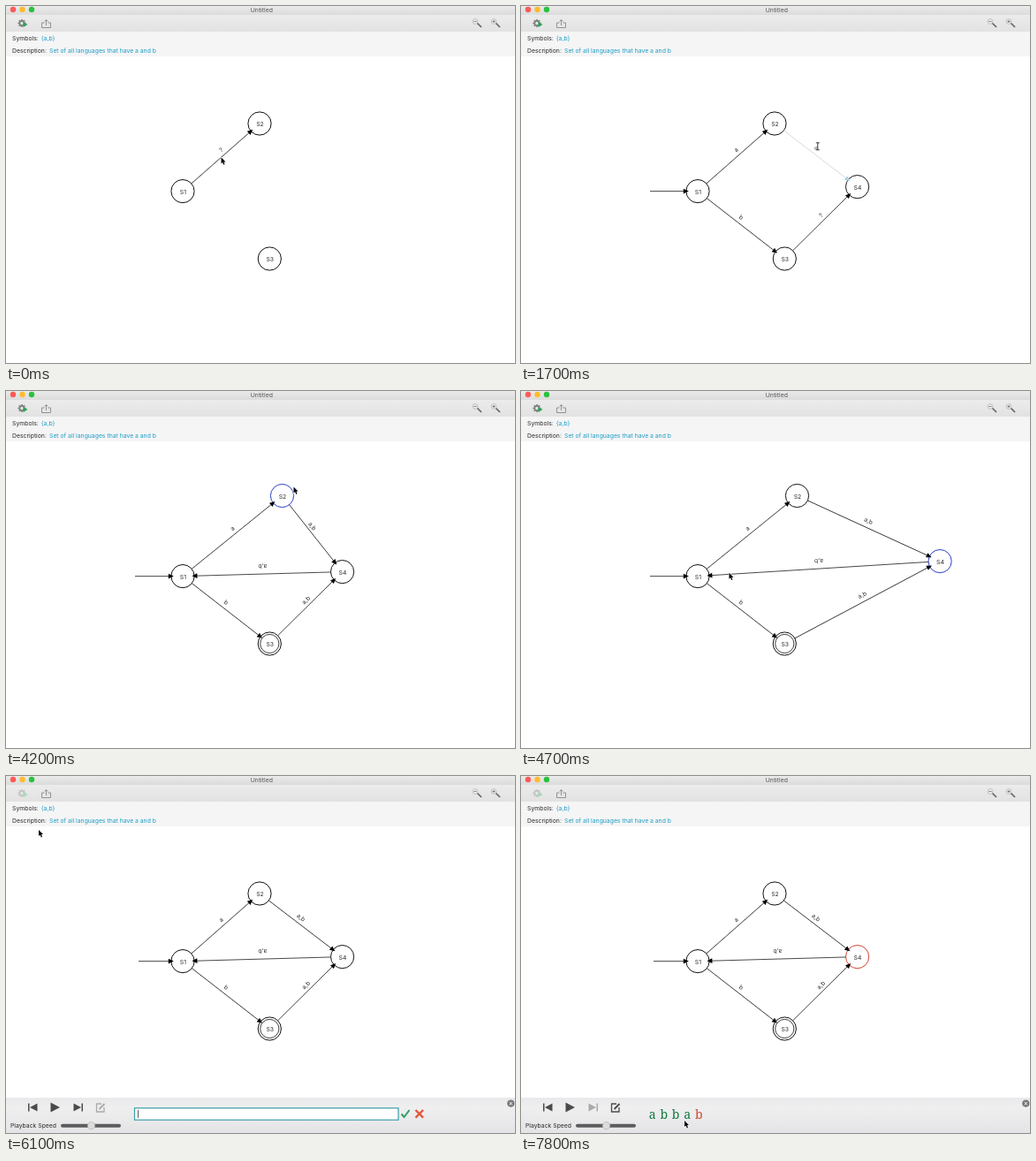
These frames come from a looping animation (576x404 px, 8000 ms). An HTML page with a canvas:

```html
<!DOCTYPE html>
<html lang="en">
<head>
<meta charset="utf-8">
<title>State machine editor</title>
<style>
  html, body { margin: 0; width: 100%; height: 100%; overflow: hidden; background: #fff; }
  canvas { display: block; width: 576px; height: 404px; }
</style>
</head>
<body>
<canvas id="stage" width="576" height="404"></canvas>
<script>
const ctx = document.getElementById('stage').getContext('2d');
const LOOP = 8000, STEP = 100;
const UNDO = 5200, ACCEPT = 3800, PANEL = 6100, CONFIRM = 6800;
const INK = '#111', BLUE = '#2a3fc4', RED = '#cf3f30', TEAL = '#1c9dc4';
const WORD = 'abbab';

const HOME = {
  S1: { x: 200, y: 209.6 }, S2: { x: 287, y: 133 },
  S3: { x: 298.3, y: 286 }, S4: { x: 380.6, y: 204.6 }
};

// Labels are typed one character per step, starting at `edit`.
const EDGES = [
  { from: 'S1', to: 'S2', born: 0, edit: 100, label: 'a' },
  { from: 'S1', to: 'S3', born: 400, edit: 800, label: 'b' },
  { from: 'S2', to: 'S4', born: 1400, edit: 1700, label: 'a,b' },
  { from: 'S3', to: 'S4', born: 1600, edit: 2000, label: 'a,b' },
  { from: 'S4', to: 'S1', born: 2600, edit: 3200, label: 'a,b' }
];

const DRAGS = {
  S2: { end: 4200, dx: 25.5, dy: -14.5 },
  S4: { end: 4500, dx: 93.5, dy: -12 },
  S1: { end: 5000, dx: 12, dy: -20 }
};

const SPOTS = {
  gear: { x: 18, y: 20 }, caption: { x: 37, y: 61 },
  check: { x: 451, y: 382 }, word: { x: 185, y: 390 }
};

// The pointer's itinerary as "arrival place"; a repeated place is a pause.
const ROUTE = `0 S1-S2, 300 S1-S2, 400 S3, 600 S3, 800 S1-S3, 900 S1-S3, 1100 S4, 1400 S4,
  1500 S3, 1600 S4, 1700 S2-S4, 1900 S2-S4, 2000 S3-S4, 2300 S3-S4, 2600 S1, 2900 S4-S1,
  3500 S4-S1, 3700 S3, 3800 S3, 4000 S2, 4200 S2+, 4300 S2+, 4500 S4+, 4800 S1, 5000 S1+,
  5200 S1+, 5900 gear, 6000 gear, 6100 caption, 6700 check, 7800 word, 8000 word`
  .split(',').map(stop => stop.trim().split(' '))
  .map(([time, place]) => ({ time: +time, place }));

const clamp = v => Math.min(1, Math.max(0, v));
const mix = (a, b, u) => ({ x: a.x + (b.x - a.x) * u, y: a.y + (b.y - a.y) * u });
const isEditing = (e, t) => t >= e.edit && t < e.edit + e.label.length * STEP;

function locate(place) {
  if (SPOTS[place]) return SPOTS[place];
  const [a, b] = place.split('-');
  if (b) return mix(HOME[a], HOME[b], 0.5);
  const name = a.slice(0, 2), { x, y } = HOME[name];
  if (!a.endsWith('+')) return { x: x + 4, y: y - 1 };
  return { x: x + DRAGS[name].dx + 13, y: y + DRAGS[name].dy - 10 };
}

function pointerAt(t) {
  const i = Math.max(1, ROUTE.findIndex(stop => stop.time >= t));
  const a = ROUTE[i - 1], b = ROUTE[i];
  const u = (t - a.time) / (b.time - a.time);
  return mix(locate(a.place), locate(b.place), 1 - (1 - u) ** 2);
}

function nodeAt(name, t) {
  const { x, y } = HOME[name], drag = DRAGS[name];
  if (!drag || t >= UNDO) return { x, y };
  const u = clamp((t - drag.end + 200) / 200);
  return { x: x + drag.dx * u, y: y + drag.dy * u };
}

function ringColor(name, t) {
  const drag = DRAGS[name];
  if (drag && t > drag.end - 200 && t <= drag.end + 200) return BLUE;
  return name === 'S4' && t >= CONFIRM ? RED : INK;
}

function text(str, x, y, color = '#2a2a2a', align = 'left', font = '6.83px Inter, sans-serif') {
  ctx.font = font;
  ctx.fillStyle = color;
  ctx.textAlign = align;
  ctx.fillText(str, x, y);
}

function trace(points) {
  ctx.beginPath();
  points.forEach(([x, y]) => ctx.lineTo(x, y));
}

function poly(points, fill) {
  trace(points);
  ctx.fillStyle = fill;
  ctx.fill();
}

function stroke(points, color, width = 1) {
  trace(points);
  ctx.strokeStyle = color;
  ctx.lineWidth = width;
  ctx.stroke();
}

function rect(x, y, w, h, fill) {
  ctx.fillStyle = fill;
  ctx.fillRect(x, y, w, h);
}

function circle(x, y, r, fill, line, width = 1) {
  ctx.beginPath();
  ctx.arc(x, y, r, 0, Math.PI * 2);
  if (fill) { ctx.fillStyle = fill; ctx.fill(); }
  if (line) { ctx.strokeStyle = line; ctx.lineWidth = width; ctx.stroke(); }
}

// Isosceles triangle with its base at x and its tip at x + w.
const triangle = (x, y, w, half, color) => poly([[x, y - half], [x + w, y], [x, y + half]], color);

function cross(x, y, r, color, width) {
  stroke([[x - r, y - r], [x + r, y + r]], color, width);
  stroke([[x - r, y + r], [x + r, y - r]], color, width);
}

function band(y, h, top, bottom) {
  const g = ctx.createLinearGradient(0, y, 0, y + h);
  g.addColorStop(0, top);
  g.addColorStop(1, bottom);
  rect(0, y, 576, h, g);
}

function at(x, y, angle, paint) {
  ctx.save();
  ctx.translate(x, y);
  ctx.rotate(angle);
  paint();
  ctx.restore();
}

function arrow(a, angle, length, color = INK, headColor = '#000') {
  at(a.x, a.y, angle, () => {
    stroke([[0, 0], [length - 3, 0]], color, 0.75);
    triangle(length - 6, 0, 6, 2.8, headColor);
  });
}

function drawEdge(e, t) {
  if (t < e.born) return;
  const a = nodeAt(e.from, t), b = nodeAt(e.to, t), mid = mix(a, b, 0.5);
  const dx = b.x - a.x, dy = b.y - a.y;
  const length = Math.hypot(dx, dy), angle = Math.atan2(dy, dx);
  const editing = isEditing(e, t);
  arrow(mix(a, b, 13 / length), angle, length - 23.4,
    editing ? '#d2d2d2' : INK, editing ? '#a9d3e2' : '#000');
  const label = t < e.edit ? '?' : e.label.slice(0, 1 + (t - e.edit) / STEP);
  at(mid.x, mid.y - 8.5, angle, () => text(label, 0, 2.3, editing ? '#777' : '#333', 'center'));
}

function drawMachine(t) {
  for (const name of Object.keys(HOME)) {
    if (name === 'S4' && t < 1100) continue;
    const { x, y } = nodeAt(name, t), color = ringColor(name, t);
    circle(x, y, 13.1, '#fff', color);
    if (name === 'S3' && t >= ACCEPT) circle(x, y, 10.6, null, color, 0.8);
    text(name, x + 0.4, y + 3.1, '#2a2a2a', 'center');
  }
  EDGES.forEach(e => drawEdge(e, t));
  if (t >= 1200) {
    const { x, y } = nodeAt('S1', t), reach = t < 4800 ? 54 : 50;
    arrow({ x: x - reach, y }, 0, reach - 10.2);
  }
}

function gear(x, y, color) {
  for (let i = 0; i < 8; i++) {
    at(x, y, i * Math.PI / 4, () => stroke([[2.5, 0], [4.6, 0]], color, 1.6));
  }
  circle(x, y, 2.6, null, color, 1.7);
}

function magnifier(x, plus) {
  stroke([[x + 1, 19], [x + 6, 24]], '#666', 1.7);
  circle(x - 1, 17.5, 2.9, '#ededed', '#b4b4b4', 0.8);
  stroke([[x - 2.5, 17.5], [x + 0.5, 17.5]], '#666', 0.8);
  if (plus) stroke([[x - 1, 16], [x - 1, 19]], '#666', 0.8);
}

function shareIcon(x, y) {
  const color = '#8a8a8a';
  stroke([[x - 2, y - 1], [x - 5, y - 1], [x - 5, y + 4.5], [x + 5, y + 4.5], [x + 5, y - 1], [x + 2, y - 1]], color, 0.9);
  stroke([[x, y + 2], [x, y - 4]], color, 0.9);
  stroke([[x - 2, y - 2.5], [x, y - 4.5], [x + 2, y - 2.5]], color, 0.9);
}

function drawChrome(t) {
  band(0, 10, '#eaeaea', '#dbdbdb');
  band(10, 19, '#ececec', '#e2e2e2');
  rect(0, 29, 576, 28, '#f5f5f6');
  ['#fc5b57', '#fdbc2e', '#28c23f'].forEach((c, i) => circle(8 + i * 10.5, 4, 3.2, c));
  text('Untitled', 289.3, 6.6, '#555', 'center');

  const running = t >= PANEL;
  gear(18, 19.5, running ? '#c3c6c8' : '#808080');
  triangle(19.5, 21, 5, 3, running ? '#a5d9b8' : '#2aa557');
  shareIcon(45.5, 20);
  magnifier(532, false);
  magnifier(553, true);

  text('Symbols:', 7, 38.7);
  text('{a,b}', 39.7, 38.7, TEAL);
  text('Description:', 7, 52.8);
  text('Set of all languages that have a and b', 49, 52.8, TEAL);
}

function drawTransport(confirmed) {
  const on = '#4b4b4b', off = '#aaa', y = 375;
  const next = confirmed ? off : on, pen = confirmed ? on : off;
  rect(25, y - 4.5, 1.5, 9, on);
  triangle(35.5, y, -8.5, 4.5, on);
  triangle(50.5, y, 10.5, 5.5, on);
  triangle(76.5, y, 8.5, 4.5, next);
  rect(85.5, y - 4.5, 1.5, 9, next);
  stroke([[108, 371], [102.5, 371], [102.5, 380], [111, 380], [111, y]], pen, 1.3);
  stroke([[105.5, 377], [111.5, 371]], pen, 2);

  text('Playback Speed', 5, 398);
  ctx.lineCap = 'round';
  stroke([[64, 395.7], [128, 395.7]], '#5c5c5e', 4);
  ctx.lineCap = 'butt';
  circle(96.5, 395.7, 4.2, '#dcdcdc', '#aaa', 0.6);
  circle(571.3, 370.6, 4.1, '#77777a');
  cross(571.3, 370.6, 1.6, '#fff', 1);
}

function drawInput(t) {
  rect(144.9, 375.2, 299.7, 14.6, '#3b9fa8');
  rect(146.1, 376.4, 297.3, 12.2, '#fff');
  const typed = WORD.slice(0, Math.max(0, (t - 6200) / STEP));
  text(typed, 149, 385.2, '#222', 'left', '8px Inter, sans-serif');
  const caret = 149.5 + ctx.measureText(typed).width;
  stroke([[caret, 378], [caret, 387]], '#333', 0.8);
  stroke([[447.5, 382.5], [450.5, 386], [456.5, 378]], '#2f9f63', 2);
  cross(467.8, 382.3, 4.3, '#e2573f', 2.4);
}

function drawResult() {
  [...WORD].forEach((letter, i) => {
    const color = i < WORD.length - 1 ? '#12793f' : '#cf4a28';
    text(letter, 148.8 + i * 13.1, 387.6, color, 'center', '500 14px "Noto Serif", serif');
  });
}

function drawPanel(t) {
  if (t < PANEL) return;
  const confirmed = t >= CONFIRM;
  band(364, 11, '#e9e9eb', '#efeff0');
  band(375, 29, '#efeff0', '#e4e4e6');
  drawTransport(confirmed);
  if (confirmed) drawResult();
  else drawInput(t);
}

function drawPointer(t) {
  const { x, y } = pointerAt(t);
  if (EDGES.some(e => isEditing(e, t))) {
    at(x + 2, y - 10, 0, () => {
      stroke([[0, -4], [0, 4]], '#222', 0.9);
      for (const end of [-4, 4]) stroke([[-2, end], [2, end]], '#222', 0.9);
    });
    return;
  }
  const shape = [[0, 0], [0, 7], [1.6, 5.6], [2.8, 8.4], [4, 7.8], [2.9, 5.2], [5, 5.1], [0, 0]];
  at(x, y, 0, () => {
    stroke(shape, '#fff', 1.3);
    poly(shape, '#000');
  });
}

function draw(t) {
  rect(0, 0, 576, 404, '#fff');
  drawChrome(t);
  drawMachine(t);
  drawPanel(t);
  drawPointer(t);
}

const start = performance.now();
function tick() {
  const elapsed = (performance.now() - start) % LOOP;
  draw(Math.floor(elapsed / STEP) * STEP);
  requestAnimationFrame(tick);
}
tick();
</script>
</body>
</html>
```
